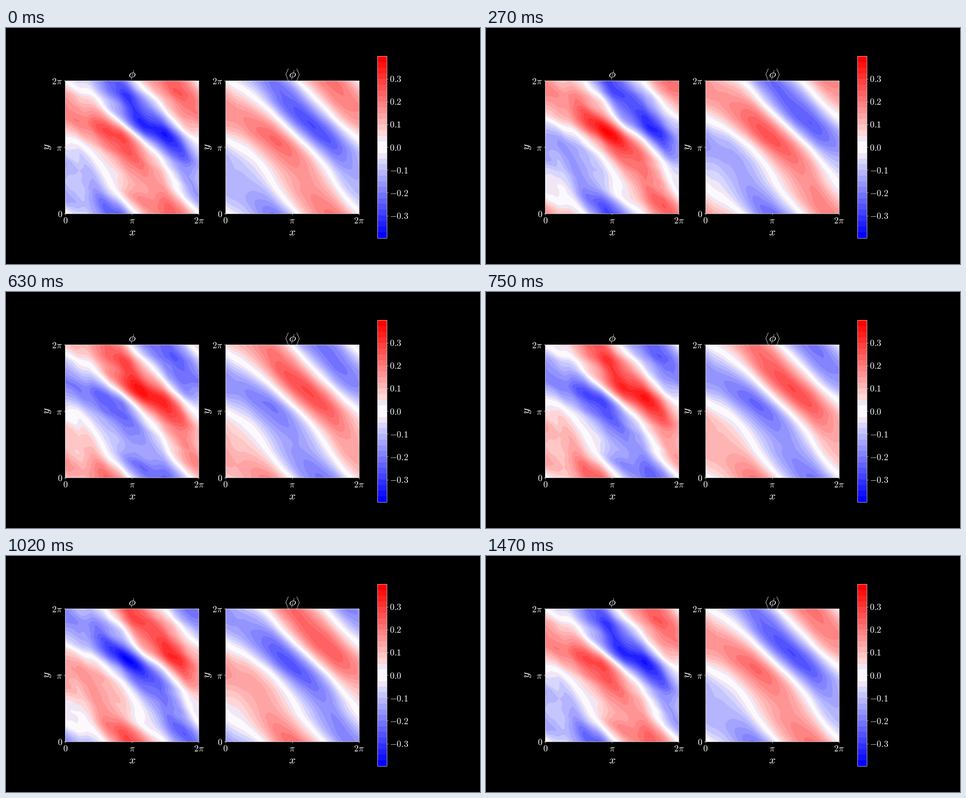
Recreate the animation shown at these times as a matplotlib script. Size 1058x529 px, loop 1500 ms.

```python
import numpy as np
import matplotlib.pyplot as plt
from matplotlib.animation import FuncAnimation

FRAMES, INTERVAL = 50, 30
MODES = 25          # largest wave number
GRID = 257
RHO = 0.5           # gyration radius used for the average
LIMIT = 0.398       # end of the colour scale
PEAK = 0.397        # largest value of the potential

plt.style.use("dark_background")
plt.rcParams.update({"mathtext.fontset": "cm", "font.size": 22})


def bessel_j0(z):
    angles = (np.arange(64) + 0.5) * np.pi / 64
    return np.cos(z[..., None] * np.sin(angles)).mean(axis=-1)


def make_waves():
    """Complex potential and its gyro-average on the grid, indexed [y, x]."""
    phases = 2 * np.pi * np.random.RandomState(27).random_sample((MODES, MODES))
    n = np.arange(1, MODES + 1)
    k = np.hypot(n[:, None], n[None, :])
    coeffs = np.where(k <= MODES, np.exp(1j * phases) / k**3, 0)
    basis = np.exp(1j * np.outer(grid, n))
    potential = basis @ coeffs @ basis.T
    average = basis @ (coeffs * bessel_j0(RHO * k)) @ basis.T
    scale = PEAK / np.abs(potential).max()
    return scale * potential, scale * average


grid = np.linspace(0, 2 * np.pi, GRID)
waves = make_waves()
levels = np.linspace(-LIMIT, LIMIT, 33)
colors = list(plt.get_cmap("bwr")(np.linspace(0, 1, 32)))
colors[14] = colors[17] = (0.945, 0.905, 0.955, 1)
colors[15] = colors[16] = (0.988, 0.975, 0.996, 1)

fig, axes = plt.subplots(1, 2, figsize=(16, 8), dpi=66.125)


def draw_fields(frame):
    turn = np.exp(-2j * np.pi * frame / (FRAMES - 1))
    return [ax.contourf(grid, grid, (wave * turn).imag, levels=levels, colors=colors)
            for ax, wave in zip(axes, waves)]


def put_text(ax, x, y, text, size=28, **style):
    ax.text(x, y, text, transform=ax.transAxes, ha="center", va="center",
            fontsize=size, **style)


def style_axes(ax):
    ticks, labels = [0, np.pi, 2 * np.pi], ["$0$", r"$\pi$", r"$2\pi$"]
    ax.set_aspect("equal")
    ax.set_xticks(ticks, labels)
    ax.set_yticks(ticks, labels)
    ax.set_title(r"$\phi$", fontsize=28, pad=5)
    put_text(ax, 0.5, -0.14, "$x$")
    put_text(ax, -0.139, 0.5, "$y$", rotation=90)


contours = draw_fields(0)
for ax in axes:
    style_axes(ax)
put_text(axes[1], 0.456, 1.044, r"$\langle$", 23.5)
put_text(axes[1], 0.540, 1.044, r"$\rangle$", 23.5)

bar = fig.colorbar(contours[0], ax=list(axes))
values = np.arange(3, -4, -1) / 10
bar.set_ticks(values, labels=[f"${v:.1f}$" for v in values])


def update(frame):
    global contours
    for contour in contours:
        contour.remove()
    contours = draw_fields(frame)
    return contours


animation = FuncAnimation(fig, update, frames=FRAMES, interval=INTERVAL,
                          init_func=lambda: [], repeat=True, repeat_delay=0)
plt.show()
```
